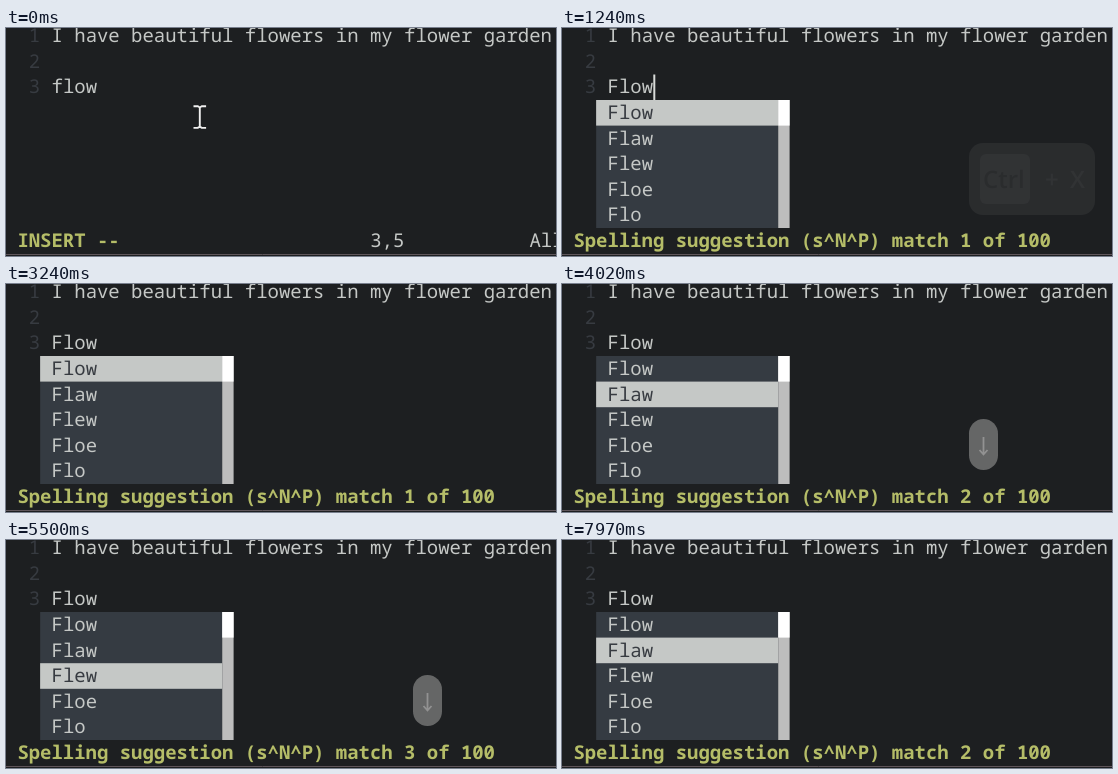
An HTML page that plays this animation: 550x228 px, repeating every 8000 ms.

```html
<!DOCTYPE html>
<html lang="en">
<head>
<meta charset="utf-8">
<title>Spelling suggestions</title>
<style>
  html, body { margin: 0; width: 100%; height: 100%; overflow: hidden; background: #1d1f21; }
  svg { display: block; }
  text { font: 500 18.97px "Noto Sans Mono", monospace; fill: #c5c8c6; text-rendering: geometricPrecision; white-space: pre; }
  .nr { fill: #373b41; }
  .mode { font-weight: 700; fill: #b5bd68; }
  #keys text { font: 600 24px "Open Sans", sans-serif; fill: #8d8d8d; }
  #keys .cap { fill: #656666; }
</style>
</head>
<body>
<svg width="550" height="228" viewBox="0 0 550 228">
  <rect width="550" height="228" fill="#1d1f21"/>
  <g id="buffer"></g>
  <rect id="cursor" x="91.3" y="46.5" width="2" height="25.5" fill="#d8dad8"/>
  <g id="popup"></g>
  <g id="status"></g>
  <path id="mouse" d="M187.5 78.3h4.3l2 1.2l2-1.2h4.3M193.8 79.5v19M187.5 99.9h4.3l2-1.2l2 1.2h4.3" fill="none" stroke="#f0f0f0" stroke-width="1.9"/>
  <g id="keys">
    <g id="combo">
      <rect id="plate" x="407" y="115" height="72" rx="14" fill="#656666"/>
      <rect x="418" y="126" width="50" height="50" rx="6" fill="#8d8d8d"/>
      <text class="cap" x="421" y="160">Ctrl</text>
      <text x="483" y="160">+</text>
      <text id="letter" x="508" y="160"></text>
    </g>
    <g id="arrow">
      <rect x="407" y="135" width="29" height="51" rx="14.5" fill="#656666"/>
      <path d="M421.5 153v17M417.5 166l4 4.5l4-4.5" fill="none" stroke="#929292" stroke-width="1.8"/>
    </g>
  </g>
  <path d="M0 226.5H550" stroke="#5e555a"/>
</svg>
<script>
const LOOP = 8000, COL = 11.38, ROW = 25.6, TOP = 72;
const $ = id => document.getElementById(id);
const words = ["Flow", "Flaw", "Flew", "Floe", "Flo"];

// Rows count from the first popup row; columns from the left edge.
const label = (col, row, str, cls = "") =>
  `<text class="${cls}" x="${col * COL}" y="${TOP + row * ROW + 19}">${str}</text>`;
const box = (col, row, cols, rows, fill) =>
  `<rect x="${col * COL}" y="${TOP + row * ROW}" width="${cols * COL}" height="${rows * ROW}" fill="${fill}"/>`;
const show = (id, on) => $(id).setAttribute("visibility", on ? "visible" : "hidden");

// Value of the last step [time, value] already reached.
const at = (steps, t) => steps.reduce((v, [start, next]) => t >= start ? next : v, steps[0][1]);

const blinks = [250, 1010, 1240, 1930, 2240, 2630, 2860, 3240, 3340, 4020, 4250,
  4630, 4800, 5500, 5730, 6190, 6420, 7360, 7590, 7970];
const selection = [[0, 0], [1240, 1], [3340, 2], [4800, 3], [6650, 2]];
const keyName = [[0, ""], [480, "X"], [1320, "S"], [2320, ""], [3340, "down"], [4400, ""],
  [4800, "down"], [5880, ""]];
const keyAlpha = [[0, 0], [480, 1], [1240, .18], [1320, 1], [2240, .8], [2320, 0],
  [3340, 1], [4250, .8], [4320, .25], [4400, 0],
  [4800, 1], [5730, .8], [5800, .25], [5880, 0]];

function popup(selected) {
  const items = words.map((word, i) => {
    const on = i === selected - 1;
    return (on ? box(3, i, 16, 1, "#c5c8c6") : "") +
      label(4, i, on ? `<tspan fill="#373b41">${word}</tspan>` : word);
  });
  return box(3, 0, 16, 5, "#353b42") + items.join("") +
    box(19, 0, 1, 5, "#bdbdbd") + box(19, 0, 1, 1, "#fff");
}

function status(t, selected) {
  if (selected) return label(1, 5, `Spelling suggestion (s^N^P) match ${selected} of 100`, "mode");
  if (t >= 480) return label(1, 5, "^X mode (^]^D^E^F^I^K^L^N^O^Ps^U^V^Y)", "mode");
  return label(1, 5, "INSERT --", "mode") + label(32, 5, "3,5") + label(46, 5, "All");
}

let shown = "";
function draw(now) {
  const t = now % LOOP, selected = at(selection, t), key = at(keyName, t);
  const phase = selected + "/" + (t >= 480);
  if (phase !== shown) {
    shown = phase;
    $("buffer").innerHTML = [1, 2, 3].map(n => label(2, n - 4, n, "nr")).join("") +
      label(4, -3, "I have beautiful flowers in my flower garden") +
      label(4, -1, selected ? "Flow" : "flow");
    $("popup").innerHTML = selected ? popup(selected) : "";
    $("status").innerHTML = status(t, selected);
  }
  show("mouse", t < 480);
  show("cursor", blinks.filter(b => b <= t).length % 2);
  show("arrow", key === "down");
  show("combo", key.length === 1);
  $("letter").textContent = key.length === 1 ? key : "";
  $("plate").setAttribute("width", key === "X" ? 126 : 124);
  $("keys").setAttribute("opacity", at(keyAlpha, t));
  requestAnimationFrame(() => draw(performance.now() - start));
}
const start = performance.now();
draw(0);
</script>
</body>
</html>
```
